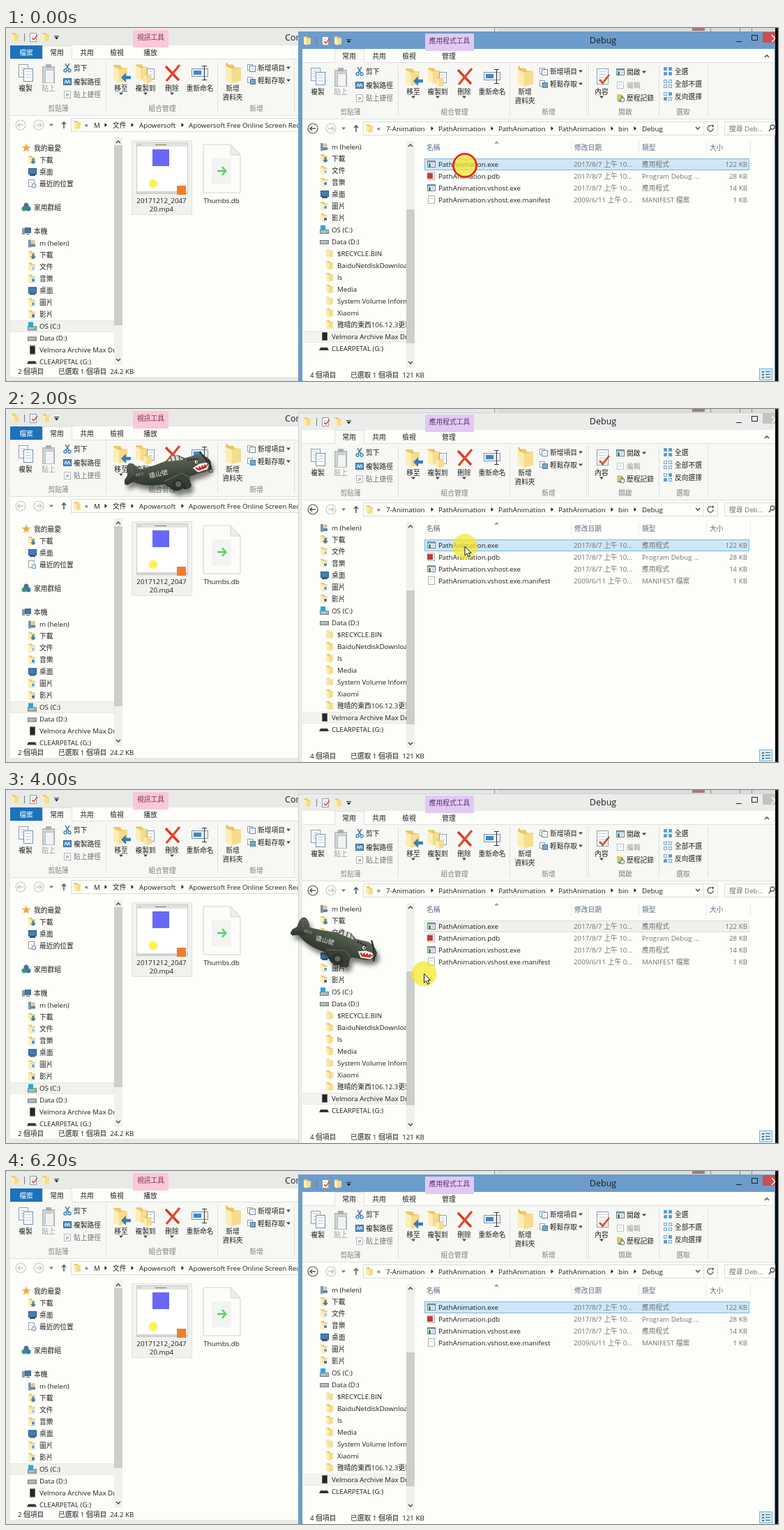
Recreate the animation shown at these times as an HTML page with a canvas. Size 1107x506 px, loop 6.4 s.

```html
<!DOCTYPE html>
<html lang="zh-Hant">
<head>
<meta charset="utf-8">
<title>Path animation</title>
<style>
html, body { margin: 0; width: 100%; height: 100%; overflow: hidden; background: #fdfefa; }
canvas { display: block; width: 1107px; height: 506px; }
</style>
</head>
<body>
<canvas id="stage" width="1107" height="506"></canvas>
<script>
const ctx = document.getElementById('stage').getContext('2d');
const LOOP = 6400, STEP = 200;
const PAPER = '#fdfefa', INK = '#1e1e1e', DIM = '#9a9c9a', GREY = '#6f7270', BLUE = '#2f7fc4';
const FONT = '"Open Sans", "Noto Sans CJK TC", "Noto Sans CJK", "Noto Sans", sans-serif';

function rect(x, y, w, h, fill, stroke) {
  if (fill) { ctx.fillStyle = fill; ctx.fillRect(x, y, w, h); }
  if (stroke) { ctx.strokeStyle = stroke; ctx.lineWidth = 1; ctx.strokeRect(x + .5, y + .5, w - 1, h - 1); }
}
function poly(points, fill, stroke, width = 1) {
  ctx.beginPath();
  points.forEach(([x, y], i) => i ? ctx.lineTo(x, y) : ctx.moveTo(x, y));
  if (fill) { ctx.closePath(); ctx.fillStyle = fill; ctx.fill(); }
  if (stroke) { ctx.strokeStyle = stroke; ctx.lineWidth = width; ctx.stroke(); }
}
function disc(x, y, r, fill, stroke, width = 1) {
  ctx.beginPath();
  ctx.arc(x, y, r, 0, Math.PI * 2);
  if (fill) { ctx.fillStyle = fill; ctx.fill(); }
  if (stroke) { ctx.strokeStyle = stroke; ctx.lineWidth = width; ctx.stroke(); }
}
function text(s, x, y, color = INK, align = 'left', size = 9.75) {
  ctx.font = `${size}px ${FONT}`;
  ctx.textAlign = align;
  ctx.fillStyle = color;
  ctx.fillText(s, x, y + size * .36);
}
const label = (s, x, y, color) => text(s, x, y, color, 'center');
const vline = (x, y, h, c = '#dfe1de') => rect(x, y, 1, h, c);
const hline = (x, y, w, c = '#dfe1de') => rect(x, y, w, 1, c);
const caret = (x, y, c = '#444') => poly([[x - 3, y - 1.5], [x + 3, y - 1.5], [x, y + 2]], c);
const crumb = (x, y) => poly([[x - 1.5, y - 3], [x + 2, y], [x - 1.5, y + 3]], '#222');
const chevron = (x, y, d) => poly([[x - 3, y + 2 * d], [x, y - d], [x + 3, y + 2 * d]], null, '#555', 1.6);

function at(x, y, scale, draw) {
  ctx.save();
  ctx.translate(x, y);
  ctx.scale(scale, scale);
  draw();
  ctx.restore();
}
function clipped(x, y, w, h, draw) {
  ctx.save();
  ctx.beginPath();
  ctx.rect(x, y, w, h);
  ctx.clip();
  draw();
  ctx.restore();
}

function folder(x, y, scale = 1) {
  at(x, y, scale, () => {
    poly([[-5, -6], [0, -6], [1, -4], [5, -4], [5, 5], [-5, 5]], '#eac868');
    poly([[-5, -5], [-1, -3], [-1, 6.5], [-5, 5]], '#fbeeb5');
    poly([[-1, -3], [5, -4], [5, 5], [-1, 6.5]], '#f6dc8b');
  });
}
function page(x, y, w, h, stroke = '#8d9cad') {
  rect(x, y, w, h, '#fff', stroke);
  for (let i = 4; i < h - 4; i += 4) hline(x + 3, y + i, w - 6, '#b9cbe0');
}
function arrow(x, y, s, color, turn = 0) {
  ctx.save();
  ctx.translate(x, y);
  ctx.rotate(turn);
  poly([[-s, -s / 3], [0, -s / 3], [0, -s], [s, 0], [0, s], [0, s / 3], [-s, s / 3]], color);
  ctx.restore();
}
function check(x, y, s, color = '#d9542b') {
  poly([[x - s, y], [x - s / 3, y + s * .7], [x + s, y - s]], null, color, s * .4);
}
function appIcon(x, y) {
  rect(x - 6, y - 5, 12, 10, '#fff', '#6f7c88');
  rect(x - 5, y - 4, 10, 2, '#8fa6ba');
  rect(x - 4, y - 1, 3, 5, '#3d8a5c');
  rect(x, y - 1, 4, 4, '#c8d8e6');
}

const drive = (x, y, body = '#b9bdbf') => {
  rect(x - 6, y - 2, 13, 6, body, '#777');
  rect(x + 3, y + 1, 2, 1, '#4caf50');
};
const badge = color => (x, y) => { folder(x, y); rect(x - 1, y - 1, 6, 6, color, '#fff'); };
const icons = {
  folder,
  user(x, y) { rect(x - 5, y - 5, 4, 11, '#7d97a8'); disc(x + 2, y - 2, 2.7, '#e5bd95'); rect(x - 1, y + 1, 6, 4, '#5d87a8'); },
  down(x, y) { folder(x, y); arrow(x + 2, y + 2, 4, BLUE, Math.PI / 2); },
  doc: badge('#a7c3dc'), music: badge('#3f8fd6'), pic: badge('#63a9c9'), video: badge('#5a6f86'),
  desk(x, y) { rect(x - 5, y - 5, 12, 9, '#3f7fbd', '#27557f'); rect(x - 3, y + 4, 8, 2, '#48535d'); },
  os(x, y) { drive(x, y + 2); rect(x - 5, y - 6, 7, 7, '#26a8dc'); },
  drive,
  faded(x, y) { ctx.globalAlpha = .5; folder(x, y); ctx.globalAlpha = 1; },
  black(x, y) { rect(x - 3, y - 6, 8, 12, '#252525', '#666'); },
  usb(x, y) { poly([[x - 5, y - 1], [x + 5, y - 1], [x + 7, y + 3], [x - 7, y + 3]], '#34373a'); },
  recent(x, y) { page(x - 5, y - 6, 9, 11); disc(x + 3, y + 3, 3, '#dfe9f1', '#6989a4'); },
  star(x, y) {
    poly(Array.from({ length: 10 }, (_, i) => {
      const a = i * Math.PI / 5 - Math.PI / 2, r = i % 2 ? 2.8 : 6.8;
      return [x + r * Math.cos(a), y + r * Math.sin(a)];
    }), '#f5a83c');
  },
  home(x, y) { disc(x - 3, y + 2, 3.5, '#3c9c62'); disc(x + 3, y + 2, 3.5, '#2f79b9'); disc(x, y - 3, 3.5, '#4c6fa0'); },
  pc(x, y) { rect(x - 2, y - 5, 9, 8, '#3c78b8', '#59636b'); rect(x - 6, y - 4, 4, 9, '#8f999f'); rect(x, y + 4, 5, 1, '#555'); }
};

const libs = [['m (helen)', 'user'], ['下載', 'down'], ['文件', 'doc'], ['音樂', 'music'], ['桌面', 'desk'],
  ['圖片', 'pic'], ['影片', 'video'], ['OS (C:)', 'os'], ['Data (D:)', 'drive']];
const disks = [['Velmora Archive Max Drive', 'black'], ['CLEARPETAL (G:)', 'usb']];
const dirs = [['$RECYCLE.BIN', 'faded'], ['BaiduNetdiskDownload', 'folder'], ['ls', 'folder'], ['Media', 'folder'],
  ['System Volume Information', 'faded'], ['Xiaomi', 'folder'], ['雅晴的東西106.12.3更新', 'folder']];

function row(name, kind, x, y) {
  icons[kind](x, y);
  text(name, x + 11, y);
}

// Parts both windows share, in the left window's coordinates.
function shell(right, tool) {
  rect(6, 25, right - 6, 475, PAPER);
  rect(tool.x, 3, tool.w, 22, tool.fill);
  rect(tool.x, 25, tool.w, 3, tool.fill);
  label(tool.name, tool.x + tool.w / 2, 13, tool.ink);
  folder(13, 13);
  vline(26, 8, 11, '#777');
  page(34, 7, 10, 13);
  check(41, 14, 4);
  folder(57, 13);
  hline(69, 11, 7, '#333');
  caret(72.5, 14.5, '#222');

  rect(6, 44, right - 6, 81, '#f7f8f4');
  hline(6, 44, right - 6);
  hline(6, 125, right - 6);
  rect(52, 25, 43, 20, '#f9faf6', '#dfe1de');
  rect(53, 43, 41, 3, '#f8f9f5');
  ['常用', '共用', '檢視'].forEach((s, i) => label(s, 73 + i * 43, 35));
  label(tool.tab, tool.x + tool.w / 2 - (tool.w < 60 ? .5 : 1), 35);
  [143, 303, 413].forEach(x => vline(x, 48, 73));
  [['剪貼簿', 75], ['組合管理', 224], ['新增', 359]].forEach(([s, x]) => label(s, x, 115, '#7d807d'));

  page(18, 52, 14, 19);
  page(25, 58, 14, 19, '#6e8fb4');
  label('複製', 28, 86);
  rect(52, 55, 18, 24, '#cfd3d4', '#a9afb1');
  rect(57, 52, 8, 5, '#a9afb1');
  rect(56, 60, 13, 19, '#f2f3f3', '#bcc0c1');
  label('貼上', 61, 86, DIM);
  poly([[85, 51], [90, 59]], null, '#59779a', 1.5);
  poly([[91, 51], [86, 59]], null, '#59779a', 1.5);
  disc(85, 61, 2, null, BLUE, 1.3);
  disc(91, 61, 2, null, BLUE, 1.3);
  text('剪下', 97, 57);
  rect(82, 72, 12, 10, '#5795c9', '#37648c');
  poly([[84, 79], [86, 75], [88, 79], [90, 75], [92, 79]], null, '#fff');
  text('複製路徑', 97, 77);
  page(83, 90, 10, 11, '#b2b8bb');
  arrow(88, 96, 3, '#a9b8c4', -.8);
  text('貼上捷徑', 97, 95, GREY);

  folder(164, 65, 2);
  arrow(172, 71, 7, BLUE, Math.PI);
  folder(195, 63, 1.8);
  page(202, 58, 11, 16);
  folder(203, 72, 1.1);
  poly([[229, 55], [248, 75]], null, '#d93a22', 3.4);
  poly([[249, 53], [230, 76]], null, '#e04a2c', 3.4);
  rect(266, 58, 24, 12, '#e7f0f7', '#7f95a8');
  rect(269, 61, 11, 6, '#3f87c5');
  vline(284, 54, 20, '#333');
  hline(281, 54, 7, '#333');
  hline(281, 74, 7, '#333');
  label('移至', 165, 86); label('複製到', 200, 86); label('刪除', 238, 86); label('重新命名', 278, 86);
  [165, 200, 238].forEach(x => caret(x, 94));

  folder(326, 65, 2.1);
  poly([[316, 50], [319, 56]], null, '#f0b53d', 2);
  label('新增', 325, 86);
  label('資料夾', 325, 99);
  page(346, 52, 8, 9); page(349, 54, 9, 9, '#5f86ac');
  text('新增項目', 361, 57);
  page(346, 70, 8, 9); rect(350, 73, 8, 8, '#79a6cb', '#54799a');
  text('輕鬆存取', 361, 75);
  caret(405, 57); caret(405, 75);
}

function navBar(backColor, right) {
  disc(21, 139, 7, null, backColor, 1.2);
  disc(47, 139, 7, null, '#c5c8c6', 1.2);
  poly([[25, 139], [17, 139], [20, 136], [17, 139], [20, 142]], null, backColor, 1.4);
  poly([[43, 139], [51, 139], [48, 136], [51, 139], [48, 142]], null, '#c5c8c6', 1.4);
  caret(65, 139, '#777');
  poly([[83, 144], [83, 135], [80, 138], [83, 135], [86, 138]], null, '#555', 1.5);
  rect(93, 129, right - 93, 20, PAPER, '#d9dbd8');
  folder(102, 139);
}

function scrollbar(x, top, bottom, thumbTop, thumbEnd) {
  rect(x, top, 12, bottom - top, '#f0f1ee');
  rect(x, thumbTop, 12, thumbEnd - thumbTop, '#cccecc');
  chevron(x + 6, top + 6, 1);
  chevron(x + 6, bottom - 7, -1);
}

function leftWindow() {
  rect(0, 0, 420, 506, '#e8eae8');
  text('Com', 400, 13, INK, 'left', 12.5);
  shell(420, { x: 182, w: 51, name: '視訊工具', tab: '播放', fill: '#fac8d9', ink: '#7b3550' });
  rect(6, 25, 46, 19, '#1b72bd');
  label('檔案', 29, 35, '#fff');
  navBar('#c5c8c6', 440);
  text('«', 113, 138); text('M', 126, 139); text('文件', 153, 139);
  text('Apowersoft', 191, 139); text('Apowersoft Free Online Screen Recorder', 262, 139);
  [143, 181, 253].forEach(x => crumb(x, 139));

  clipped(6, 155, 149, 329, () => {
    rect(6, 419, 149, 17, '#f1f2ec', '#e7e8e3');
    row('我的最愛', 'star', 29, 172);
    [['下載', 'down'], ['桌面', 'desk'], ['最近的位置', 'recent']].forEach((r, i) => row(...r, 37, 189 + i * 17));
    row('家用群組', 'home', 29, 257);
    row('本機', 'pc', 29, 291);
    [...libs, ...disks].forEach((r, i) => row(...r, 37, 308.5 + i * 17));
  });
  scrollbar(155, 157, 483, 168, 426);

  rect(180, 161, 87, 107, '#f1f2ee', '#e1e3df');
  rect(187, 164, 74, 74, '#fff', '#c9cbc8');
  rect(188, 165, 72, 5, '#e2e2de');
  hline(214, 167, 16, '#777');
  hline(189, 167, 5, '#d8b36a');
  rect(188, 234, 72, 3, '#d4d6d4');
  rect(210, 174, 24, 24, '#6868f8');
  disc(211, 223, 6.5, '#fbf356');
  rect(245, 226, 13, 13, '#ef7d2d');
  label('20171212_2047', 223, 247);
  label('20.mp4', 223, 259);
  poly([[283, 167], [322, 167], [336, 182], [336, 236], [283, 236], [283, 167]], '#fcfcf9', '#d3d5d2');
  poly([[322, 167], [322, 182], [336, 182]], '#eceeeb', '#d3d5d2');
  rect(295, 187, 28, 37, '#f2f4f1');
  poly([[303, 205], [315, 205], [310, 199], [315, 205], [310, 211]], null, '#58cd72', 2.4);
  label('Thumbs.db', 309, 247);
  text('2 個項目', 17, 492);
  text('已選取 1 個項目  24.2 KB', 75, 492);
}

function openGroup() {
  [[835, 48], [936, 48], [1006, 48]].forEach(([x, y]) => vline(x, y + 5, 73));
  page(847, 58, 17, 23);
  check(858, 74, 7);
  label('內容', 854, 91);
  caret(854, 99);
  appIcon(881, 63);
  text('開啟', 890, 63);
  caret(915, 63);
  page(876, 77, 10, 10, '#bdbfbd');
  text('編輯', 890, 82, DIM);
  disc(881, 101, 5, '#68a957'); rect(876, 95, 6, 8, '#e6c267'); disc(884, 103, 3, '#e8eef2', '#5f7b91');
  text('歷程記錄', 890, 100);
  label('開啟', 888, 120, '#7d807d');
  ['全選', '全部不選', '反向選擇'].forEach((s, i) => {
    const y = 62 + i * 18;
    for (let k = 0; k < 4; k++) {
      const filled = i === 0 || (i === 2 && (k === 1 || k === 2));
      rect(943 + (k % 2) * 7, y - 6 + (k >> 1) * 7, 5, 5, filled ? '#4f9bd9' : '#fff', '#6da5d3');
    }
    text(s, 959, y);
  });
  label('選取', 971, 120, '#7d807d');
}

function rightTree(s) {
  clipped(426, 162, 148, 323, () => {
    rect(426, 434, 148, 17, '#f2f3ec', '#e9eae2');
    if (s.hover) rect(426, 451, 148, 17, '#e6f3f8', '#9ccde4');
    [...libs, ...dirs, ...disks].forEach((r, i) => {
      const y = 170 + i * 17, child = i > 8 && i < 16, x = child ? 464 : 456;
      row(...r, x, y);
      if (!s.twisties || i === 13) return;
      const tx = child ? 452 : 444;
      if (i === 8) poly([[tx + 2, y - 2], [tx + 2, y + 3], [tx - 3, y + 3]], '#333');
      else poly([[tx - 1.5, y - 3], [tx + 2, y], [tx - 1.5, y + 3], [tx - 1.5, y - 3]], '#fff', '#b4b6b4');
    });
  });
  scrollbar(574, 162, 487, 260, 452);
}

const files = [['PathAnimation.exe', '2017/8/7 上午 10...', '應用程式', '122 KB'],
  ['PathAnimation.pdb', '2017/8/7 上午 10...', 'Program Debug ...', '28 KB'],
  ['PathAnimation.vshost.exe', '2017/8/7 上午 10...', '應用程式', '14 KB'],
  ['PathAnimation.vshost.exe.manifest', '2009/6/11 上午 0...', 'MANIFEST 檔案', '1 KB']];

function fileList(s) {
  [['名稱', 603], ['修改日期', 815], ['類型', 912], ['大小', 1009]].forEach(([n, x]) => text(n, x, 171, '#5b6b86'));
  [810, 907, 1004, 1067].forEach(x => vline(x, 162, 18, '#e6e8e5'));
  poly([[700, 165.5], [703.5, 162], [707, 165.5]], '#8e9aa6');
  if (s.dimRow) rect(600, 187, 466, 17, '#f0f1ee', '#dcdedb');
  else rect(600, 187, 466, 17, '#cfe6f6', '#7db6de');
  files.forEach(([name, date, type, size], i) => {
    const y = 195 + i * 17;
    if (i === 0 || i === 2) appIcon(610, y);
    else page(605, y - 6, 10, 12, '#a9adab');
    if (i === 1) rect(604, y - 4, 8, 8, '#c63a35');
    text(name, 620, y);
    text(date, 814, y, GREY);
    text(type, 912, y, GREY);
    text(size, 1063, y, GREY, 'right');
  });
}

function rightWindow(s) {
  rect(420, 0, 683, 5, '#e6e8e7');
  rect(705, 0, 398, 5, '#d9dcdb');
  rect(984, 0, 18, 4, '#a4797a');
  [700, 1010, 1052, 1069].forEach(x => vline(x, 0, 5, '#858b8e'));
  rect(419, 5, 684, 501, s.focus ? '#6c9ccb' : '#ebedeb');
  if (!s.focus) { vline(419, 5, 501, '#d0d3d2'); hline(419, 5, 684, '#d0d3d2'); }
  ctx.save();
  ctx.translate(419, 5);
  shell(683, { x: 182, w: 70, name: '應用程式工具', tab: '管理', fill: '#e2c9f4', ink: '#54376d' });
  navBar('#555', 602);
  ctx.restore();
  rect(426, 500, 676, 6, PAPER);
  text('Debug', 856, 17, INK, 'center', 12.5);
  hline(1047, 19, 8, '#222');
  rect(1069, 10, 9, 8, null, '#222');
  rect(1085, 6, 18, 15, s.focus ? '#cc4f4e' : '#c2c4c2');
  poly([[1098, 10], [1103, 15], [1098, 20]], null, '#fff', 1.5);
  chevron(1091, 40, 1);
  openGroup();

  text('«', 532, 143);
  [['7-Animation', 545], ['PathAnimation', 620], ['PathAnimation', 706], ['PathAnimation', 792], ['bin', 878], ['Debug', 912]]
    .forEach(([n, x]) => text(n, x, 144));
  [611, 697, 783, 869, 902].forEach(x => crumb(x, 144));
  chevron(992, 144, -1);
  vline(1000, 135, 18);
  ctx.beginPath();
  ctx.arc(1010, 144, 4, 0, 5);
  ctx.strokeStyle = '#555'; ctx.lineWidth = 1.4; ctx.stroke();
  poly([[1011, 139], [1015, 139], [1014, 143]], '#555');
  rect(1030, 134, 80, 20, PAPER, '#d9dbd8');
  text('搜尋 Deb...', 1037, 144, GREY);
  disc(1099, 142, 3, null, '#555', 1.3);
  poly([[1097, 144], [1094, 148]], null, '#555', 1.5);

  rightTree(s);
  fileList(s);
  text('4 個項目', 436, 497);
  text('已選取 1 個項目  121 KB', 494, 497);
  rect(1080, 488, 19, 17, '#d3eaf5', '#76b5d4');
  for (let i = 0; i < 3; i++) {
    rect(1084, 492 + i * 4, 3, 2, '#3c7ea7');
    hline(1089, 492 + i * 4, 7, '#49606e');
  }
  rect(1103, 0, 4, 506, '#0b0b0b');
}

function plane([x, y, angle]) {
  ctx.save();
  ctx.translate(x, y);
  ctx.rotate(angle * Math.PI / 180);
  const body = new Path2D('M-64 -3 L-59 -9 Q-61 -26 -53 -26 Q-47 -25 -42 -15 L-20 -19 L-1 -24 Q5 -31 16 -30 L25 -25 L44 -28 Q58 -26 62 -15 Q61 -4 46 -2 L28 2 L30 15 Q24 22 18 18 Q8 24 0 15 L-8 9 Q-35 11 -52 1 L-64 4 Z');
  ctx.save();
  ctx.shadowColor = 'rgba(0,0,0,.5)';
  ctx.shadowBlur = 6;
  ctx.shadowOffsetX = 4;
  ctx.shadowOffsetY = 7;
  ctx.fillStyle = '#464f43';
  ctx.fill(body);
  ctx.restore();
  ctx.save();
  ctx.clip(body);
  const shade = ctx.createLinearGradient(0, -28, 0, 12);
  shade.addColorStop(0, '#5d6656');
  shade.addColorStop(.45, '#444d41');
  shade.addColorStop(1, '#2c322c');
  ctx.fillStyle = shade;
  ctx.fillRect(-66, -32, 132, 60);
  ctx.restore();
  poly([[-65, 1], [-50, -7], [-42, -4], [-61, 5]], '#333a32');
  poly([[-55, -24], [-51, -11]], null, '#5f6859');
  poly([[0, -23], [6, -30], [17, -29], [23, -23]], '#d5dad3');
  [5, 11, 17].forEach(px => poly([[px, -30], [px + 1, -22]], null, '#4a5247', 1.4));
  poly([[-10, 5], [18, -5], [30, 3], [24, 10], [0, 13]], '#394037');
  poly([[-8, 5], [18, -4], [28, 2]], null, '#687063');
  disc(11, 12, 8, '#2d312f');
  disc(12, 11, 4, '#626763');
  disc(26, 14, 4.5, '#373b38');
  for (let i = 0; i < 4; i++) rect(29 + i * 4, -23, 2.5, 2, '#252a25');
  poly([[35, -10], [45, -15], [60, -16], [56, -6], [42, -3]], '#f4efe9');
  poly([[38, -9], [47, -12], [59, -14], [54, -8], [43, -5]], '#c7352f');
  for (let i = 0; i < 4; i++) poly([[41 + i * 4, -11 - i], [44 + i * 4, -12 - i], [43 + i * 4, -8 - i]], '#fff');
  disc(41, -18, 2.3, '#fff');
  disc(41.5, -18, 1.1, '#111');
  poly([[47, -32], [53, -24], [60, -12], [61, -5]], null, '#262a27', 2.2);
  disc(58, -17, 3, '#343a35');
  ctx.rotate(-.1);
  text('遠山號', -14, -8, '#eef0e9', 'center', 9);
  text('2012', -41, -13, '#d9ddd4', 'center', 5);
  ctx.restore();
}

function pointer(x, y, s) {
  disc(x, y, 18, 'rgba(246,234,44,.74)');
  if (s.click) { disc(x, y, 16.5, null, '#e3201b', 2.6); return; }
  const ty = y + (s.busy ? 6 : 0);
  const shape = [[0, 0], [0, 13], [3, 10], [5.2, 15], [7.4, 14], [5.2, 9.3], [9.2, 9.3], [0, 0]];
  poly(shape.map(([px, py]) => [x + px, ty + py]), '#fff', '#111');
  if (s.busy) {
    disc(x + 12, y + 7, 4.6, null, '#2d86c8', 3);
    disc(x + 12, y + 7, 4.6, null, 'rgba(130,205,240,.6)', 1);
  }
}

// Smooth curve through keys of [time, ...values].
function follow(keys, t) {
  let i = keys.findIndex(k => k[0] > t) - 1;
  if (i < 0) i = keys.length - 2;
  const a = keys[i], b = keys[i + 1], before = keys[i - 1] || a, after = keys[i + 2] || b;
  const span = b[0] - a[0], u = Math.min(1, (t - a[0]) / span);
  return a.slice(1).map((v, n) => {
    const j = n + 1;
    const m0 = (b[j] - before[j]) / (b[0] - before[0]) * span;
    const m1 = (after[j] - a[j]) / (after[0] - a[0]) * span;
    const d = b[j] - v;
    return v + u * (m0 + u * (3 * d - 2 * m0 - m1 + u * (m0 + m1 - 2 * d)));
  });
}

const flight = [[1200, 112, 114, -18], [2000, 234, 98, -6], [2400, 284, 108, 8], [3400, 382, 196, 36],
  [4600, 562, 237, 0], [5400, 681, 172, -29], [6000, 728, 102, -46]];
const mouse = [[3600, 658, 197], [3800, 650, 203], [4600, 433, 465], [4800, 415, 487], [5000, 381, 502], [5200, 366, 530]];

function draw(t) {
  const [mx, my] = t < 3800 ? [658, 197] : follow(mouse, t);
  const s = {
    focus: t < 1400 || t >= 6200,
    click: t < 200,
    busy: t >= 600 && t < 1200,
    dimRow: t >= 3800 && t < 6200,
    twisties: t >= 4400 && t < 6200,
    hover: t === 4600
  };
  ctx.clearRect(0, 0, 1107, 506);
  leftWindow();
  rightWindow(s);
  if (t >= 1200 && t < 6200) plane(follow(flight, t));
  if (t < 5200) pointer(mx, my, s);
}

const start = performance.now();
let shown = -1;
function tick() {
  const t = Math.floor(((performance.now() - start) % LOOP) / STEP) * STEP;
  if (t !== shown) draw(shown = t);
  requestAnimationFrame(tick);
}
tick();
</script>
</body>
</html>
```
